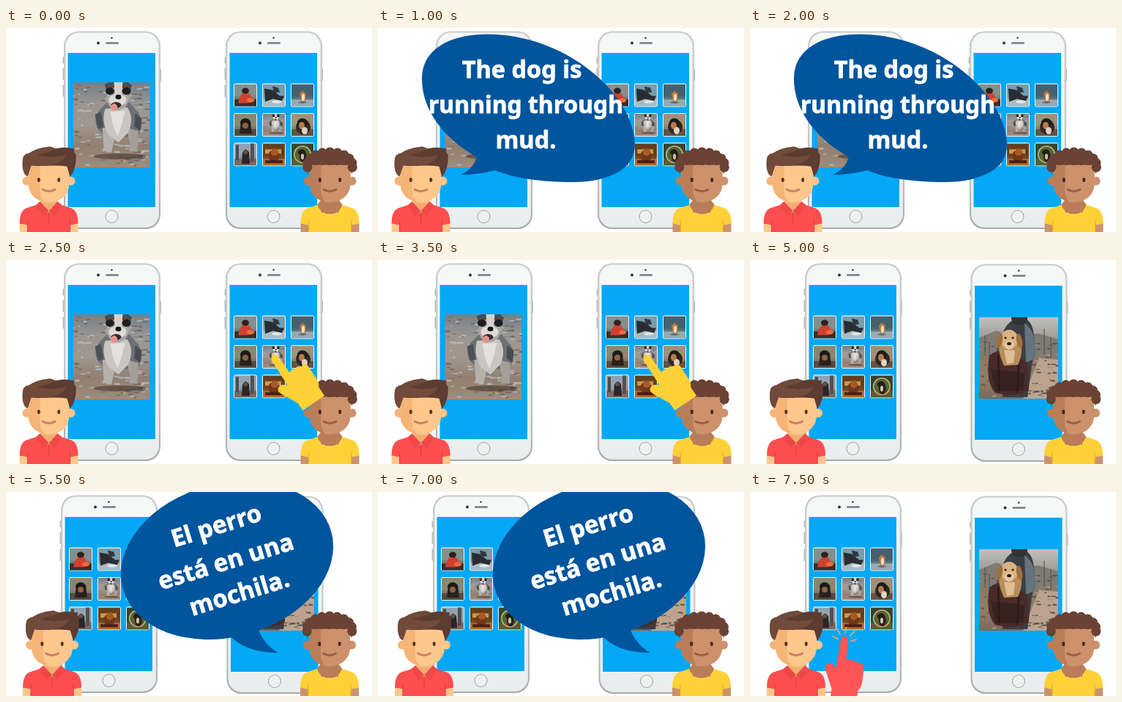
Recreate the animation shown at these times as an HTML page with a canvas. Size 500 by 278 pixels, loop 8 s.

```html
<!DOCTYPE html>
<html lang="en">
<head>
<meta charset="utf-8">
<title>Two learners and a dog</title>
<style>
html, body { margin: 0; width: 100%; height: 100%; overflow: hidden; background: #fff; }
canvas { display: block; width: 500px; height: 278px; }
</style>
</head>
<body>
<canvas id="stage"></canvas>
<script>
const canvas = document.getElementById('stage');
const c = canvas.getContext('2d');
const dpr = window.devicePixelRatio || 1;
canvas.width = 500 * dpr;
canvas.height = 278 * dpr;

const LOOP = 8000;
const BLUE = '#05a8f5', NAVY = '#00559d', RED = '#fc4d4f', YELLOW = '#fed136';

// ---- helpers ----
function at(x, y, draw, angle = 0) {
  c.save();
  c.translate(x, y);
  c.rotate(angle * Math.PI / 180);
  draw();
  c.restore();
}
function rect(x, y, w, h, fill) { c.fillStyle = fill; c.fillRect(x, y, w, h); }
function round(x, y, w, h, r, fill) {
  c.beginPath();
  c.roundRect(x, y, w, h, r);
  c.fillStyle = fill;
  c.fill();
}
function oval(x, y, rx, ry, fill, angle = 0) {
  c.beginPath();
  c.ellipse(x, y, rx, ry, angle, 0, 7);
  c.fillStyle = fill;
  c.fill();
}
function disc(x, y, r, fill) { oval(x, y, r, r, fill); }
function shape(d, fill) { c.fillStyle = fill; c.fill(new Path2D(d)); }
function line(d, color, width) {
  c.strokeStyle = color;
  c.lineWidth = width;
  c.lineCap = c.lineJoin = 'round';
  c.stroke(new Path2D(d));
}
function shade(h, ...stops) {
  const g = c.createLinearGradient(0, 0, 0, h);
  stops.forEach((s, i) => g.addColorStop(i / (stops.length - 1), s));
  return g;
}
function clip(w, h, draw) {
  c.save();
  c.beginPath();
  c.rect(0, 0, w, h);
  c.clip();
  draw();
  c.restore();
}
function flecks(n, x, y, w, h, colors, size) {
  let seed = 7;
  const rnd = () => (seed = seed * 16807 % 2147483647) / 2147483647;
  for (let i = 0; i < n; i++) {
    oval(x + rnd() * w, y + rnd() * h, size * (1 + rnd() * 2), size * (.4 + rnd() * .5),
      colors[i % colors.length]);
  }
}

// ---- phones ----
function phone(x, y) {
  at(x, y, () => {
    rect(-1.5, 35, 2, 9, '#b9bcbc');
    rect(-1.5, 50, 2, 16, '#b9bcbc');
    rect(-1.5, 73, 2, 16, '#b9bcbc');
    rect(131, 51, 2, 17, '#b9bcbc');
    round(0, 0, 132, 269.5, 20, shade(269, '#c6c9c9', '#c3c6c6', '#a9acac'));
    round(1.8, 1.5, 128.4, 266, 18.5, '#e2e5e5');
    round(3, 2.5, 126, 264, 17.5, shade(269, '#f6f8f8', '#f3f5f5', '#eaeded'));
    rect(5.5, 29.5, 119.5, 210, BLUE);
    disc(47, 16, 2, '#30343a');
    disc(65.5, 9, 1.3, '#3d4248');
    round(57, 14.8, 18, 2.4, 1.2, '#777c80');
    disc(65.5, 252.5, 9, '#9da1a1');
    disc(65.5, 252.5, 8, '#eff1f1');
  });
}

// ---- pictures ----
function mudDog() {
  clip(105, 116, () => {
    rect(0, 0, 105, 116, shade(116, '#71818b', '#9a9490', '#a1978f', '#927f70', '#a38b76'));
    flecks(150, 0, 4, 105, 112, ['#6d6a68', '#b9b3ad', '#7d6a5c', '#a8b3ba'], 1.6);
    oval(64, 101, 36, 4, 'rgba(60,48,42,.55)');
    shape('M36 38Q27 50 34 64L48 76 86 74Q98 62 91 44L78 28 46 28Z', '#6d7076');
    shape('M40 60L42 88 40 94 53 94 58 70Z', '#b5b0aa');
    shape('M73 62L78 84 76 94 88 95 89 66Z', '#a39f9b');
    shape('M44 36Q38 54 49 72L62 82 76 68Q84 48 74 34Z', '#c9c6c1');
    shape('M51 40L55 60 61 74 67 56 71 39Z', '#e4e1dc');
    shape('M30 44L38 40 42 62 34 63Z', '#4d5157');
    shape('M85 42L94 50 92 66 84 60Z', '#484b50');
    shape('M43 3L52-2 73-2 81 5 76 15 48 15Z', '#4b4d52');
    oval(61, 22, 15, 16, '#a9a8a6');
    shape('M56 0L68 0 66 20 58 20Z', '#d5d2cd');
    oval(50.5, 12, 6, 5, '#1e1f23');
    oval(73, 12, 6, 5, '#1e1f23');
    oval(61, 24, 12, 8, '#dedbd6');
    oval(62, 20, 4, 3.2, '#17181b');
    oval(59, 31, 7, 4, '#3b2528');
    oval(56, 34, 4.5, 5, '#e2918a', .4);
  });
}
function packDog() {
  clip(108, 111, () => {
    rect(0, 0, 108, 111, shade(111, '#bfc1bf', '#a09d96', '#8c7867', '#917d6b', '#7c6858'));
    shape('M0 28L24 18 48 30 80 22 108 30V54H0Z', '#7e7b74');
    shape('M60 111L82 56 108 58V111Z', '#bba38f');
    flecks(90, 0, 34, 108, 76, ['#66584c', '#a9978a', '#5c554e'], 1.5);
    line('M8 52V25M14 58V34M89 50V16M98 55V28', '#59544d', 1.2);
    // walker seen from behind
    shape('M30 38Q30 14 46 4L64 2Q77 10 76 44L72 66 66 109H32Z', '#3a3f45');
    oval(55, 1, 11, 10, '#30343a');
    shape('M62 8Q80 20 77 56L64 62Z', '#66727e');
    shape('M24 42L36 20 42 28 36 60 24 64Z', '#535a61');
    shape('M14 52Q24 44 38 46L66 62 68 98Q54 111 22 103Q8 88 14 52Z', '#492b28');
    shape('M15 70L62 76 61 100 23 101Z', '#372220');
    line('M26 52L28 100M54 64L52 102', '#241a1a', 2);
    shape('M28 28Q24 46 34 66L53 65Q62 46 55 26Q42 12 28 28Z', '#b98d5b');
    oval(41, 30, 12, 13, '#d9b384');
    oval(28, 32, 4, 10, '#a06f3f', .2);
    oval(55, 32, 4, 10, '#a06f3f', -.2);
    oval(41, 38, 6, 6, '#e6caa3');
    oval(41, 36, 3, 2.3, '#2e211b');
    disc(36, 28, 1.6, '#2e211b');
    disc(46, 28, 1.6, '#2e211b');
    shape('M34 45L49 45 47 62 38 64Z', '#dfbd94');
  });
}

const scenes = [
  ['#83918d', '#372f29', () => { shape('M7 18L13 9 20 13 27 23 18 26 5 26Z', '#d1402f');
    oval(15, 9, 5, 4, '#2b2321'); oval(22, 22, 5, 3, '#f06a3f'); }],
  ['#779dac', '#a9bbc1', () => { shape('M2 6L13 8 23 16 29 16 26 23 14 20 3 24Z', '#292d33');
    shape('M13 3L21 5 23 11 15 12Z', '#34383e'); oval(19, 24, 7, 2, '#e3e7e7'); }],
  ['#46616d', '#99a9ae', () => { shape('M11 13L15 9 20 13 19 23 16 25 13 22Z', '#b87a43');
    oval(16, 18, 2, 5, '#eee0cc'); oval(15, 25, 6, 1.2, '#59656a'); }],
  ['#8a8872', '#574b3f', () => { shape('M7 27L9 11 15 6 22 10 24 27Z', '#28211e');
    oval(15, 12, 7, 6, '#1e1a19'); oval(15, 16, 4, 4, '#8c6348'); }],
  null,
  ['#a0907b', '#655343', () => { oval(16, 18, 10, 10, '#302721'); oval(15, 12, 7, 6, '#201b18');
    oval(14, 16, 4, 5, '#b57a4d'); oval(18, 23, 4, 5, '#dfd1bf'); }],
  ['#91a3b2', '#776d65', () => { rect(2, 2, 4, 21, '#494b4b'); rect(22, 0, 5, 25, '#53514d');
    shape('M10 28L11 12 16 8 20 12 21 28Z', '#272628'); oval(15, 12, 3, 3, '#684d3e'); }],
  ['#64401f', '#b16a30', () => { rect(3, 8, 22, 6, '#d19546'); oval(15, 17, 8, 8, '#723819');
    oval(16, 12, 5, 5, '#a65a27'); rect(3, 23, 24, 4, '#43230f'); }],
  ['#3b4327', '#57602e', () => { disc(15, 15, 12, '#b6b38f'); disc(15, 15, 10.5, '#56652e');
    oval(16, 18, 5, 8, '#29251f'); oval(14, 12, 5, 4, '#211c18'); oval(15, 18, 2, 4, '#d3c4aa'); }]
];
function tile(i) {
  round(-1, -1, 32, 32, 2.5, '#eef6fa');
  clip(30, 30, () => {
    if (!scenes[i]) {
      c.scale(30 / 105, 30 / 116);
      mudDog();
      return;
    }
    const [sky, ground, draw] = scenes[i];
    rect(0, 0, 31, 31, shade(31, sky, sky, ground));
    rect(0, 21, 31, 10, ground);
    draw();
  });
}
function grid(x) {
  for (let i = 0; i < 9; i++) {
    at(x + i % 3 * 39, 76.5 + Math.floor(i / 3) * 40.4, () => tile(i));
  }
}

// ---- people ----
function face(skin, dark, eye, mouth) {
  disc(-30, 47, 6, dark);
  disc(30, 47, 6, skin);
  shape('M-12 66H12V90H-12Z', dark);
  shape('M-28 20H28V52Q26 70 8 75Q0 77-8 75Q-26 70-28 52Z', skin);
  shape('M-28 20H-12V60Q-12 71-4 76Q-26 72-28 52Z', dark);
  oval(-13.7, 45.5, 2, 2.9, eye);
  oval(13.7, 45.5, 2, 2.9, eye);
  line('M-8.5 58.5Q0 63.5 8.5 58.5', mouth, 3);
}
function torso(shirt, skin, fold) {
  shape('M-40 117V103H-29V117ZM40 117V103H29V117Z', skin);
  shape('M-40 105Q-40 88-31 84L-12 78H12L31 84Q40 88 40 105L29 107V117H-29V107Z', shirt);
  line('M-29 101V116M29 101V116', fold, 1.2);
}
function redBoy(x) {
  at(x, 161.5, () => {
    torso(RED, '#fdc68a', '#dc4043');
    face('#fec78c', '#f6b477', '#5a3424', '#c58360');
    shape('M-12 76Q0 82 12 76L11 81 0 89-11 81Z', '#f0ab6e');
    shape('M-12 75L0 88-8 95-18 80ZM12 75L0 88 8 95 18 80Z', '#f0474a');
    line('M0 90V104', '#dc4043', 1.2);
    shape('M-29 41Q-37 37-36 20Q-36 10-27 9Q-18 2 2 0Q8 2 10 3Q20 0 35 3Q33 7 37 11Q38 30 29 41L25 27Q12 25 2 26Q-10 27-24 26Z', '#704a3b');
    shape('M10 3Q20 0 35 3Q33 7 37 11Q38 30 29 41L25 27Q13 25 1 26Q21 21 23 12Q1 17-16 11Q-2 9 10 3Z', '#5d3c31');
  });
}
function yellowBoy(x) {
  const skin = '#cd926c', dark = '#b97e59', brown = '#6b4235';
  at(x, 161.5, () => {
    torso(YELLOW, skin, '#e6b525');
    face(skin, dark, '#4a2a20', '#995f46');
    shape('M-17 79L-12 73Q0 80 12 73L17 79Q13 92 0 92Q-13 92-17 79Z', dark);
    shape('M-28 20H28V52Q26 70 8 75Q0 77-8 75L-12 60V20Z', skin);
    oval(-13.7, 45.5, 2, 2.9, '#4a2a20');
    oval(13.7, 45.5, 2, 2.9, '#4a2a20');
    line('M-8.5 58.5Q0 63.5 8.5 58.5', '#995f46', 3);
    shape('M-30 38Q-35 14-20 9Q0 1 20 9Q35 14 30 38L26 25H-26Z', brown);
    for (let i = 0; i < 11; i++) {
      const a = Math.PI * (1.04 - i * .108);
      disc(Math.cos(a) * 31, 26 - Math.sin(a) * 18.5, 6.6, brown);
    }
    for (let i = -2; i < 3; i++) disc(i * 10, 19, 6.5, brown);
  });
}

// ---- hand, bubbles, ticks ----
function hand(x, y, angle, fill) {
  at(x, y, () => shape(
    'M-5 5Q-4-1 0-1Q5-1 5.5 5L6 31Q10 28 15 31Q20 29 24 33Q32 32 32 40V57Q32 65 28 70V84H-8V72L-18 52Q-24 42-17 39Q-12 37-6 44Z',
    fill), angle);
}
function taps(x, y, angle) {
  at(x, y, () => line('M0-6V-14M-7-3L-12-10M7-3L12-10M-9 4L-16 1M9 4L16 1', '#f5a862', 1.5), angle);
}
function words(text, x, y, size) {
  c.font = `700 ${size}px "Noto Sans", "Open Sans", sans-serif`;
  c.textAlign = 'center';
  c.textBaseline = 'alphabetic';
  c.fillStyle = c.strokeStyle = '#fff';
  c.lineWidth = .8;
  c.lineJoin = 'round';
  c.fillText(text, x, y);
  c.strokeText(text, x, y);
}
function englishBubble() {
  shape('M60 69C60 30 96 8.5 150 8.5C257 8.5 351 91 351 160C351 192 315 210 266 210C225 210 186 205 160 194Q136 200 113 200Q130 192 135 176C86 148 60 109 60 69Z', NAVY);
  words('The dog is', 196.5, 68, 32.5);
  words('running through', 202, 116, 31.8);
  words('mud.', 202, 164, 32.5);
}
function spanishBubble() {
  oval(302, 93, 147.6, 104.5, NAVY, -.265);
  shape('M306 196L342 180Q351 208 372 219C344 219 321 212 306 196Z', NAVY);
  [['El perro', 287, 45.5], ['está en una', 300, 94], ['mochila.', 318.5, 137]].forEach(
    ([text, x, y]) => at(x, y, () => words(text, 0, 12, 33), -17));
}
function tick(x, y) {
  at(x, y, () => {
    rect(-47, -47, 101, 93.5, '#67cc74');
    disc(0, 0, 43.5, '#85d9a5');
    disc(0, 0, 40, '#c3ecd3');
    disc(0, 0, 37.5, '#fff');
    disc(0, 0, 31, '#57b160');
    line('M-13.5 1.5L-4.5 10.5 15-10.5', '#fff', 4.6);
  });
}

// ---- scenes ----
function english(t) {
  phone(79, 4.5);
  phone(300, 4.5);
  at(91.5, 74, mudDog);
  grid(312);
  redBoy(58.5);
  yellowBoy(442.5);
  if (t >= 500 && t < 2500) englishBubble();
  if (t >= 2500) hand(365, 131, -34, YELLOW);
}
function correct() {
  phone(79, 4.5);
  phone(311.5, 4.5);
  tick(140.5, 139.5);
  tick(374, 140);
  redBoy(58.5);
  yellowBoy(439);
}
function spanish(t) {
  phone(75, 4.5);
  phone(301.5, 5.5);
  grid(87);
  at(313, 78, packDog);
  redBoy(63);
  yellowBoy(442);
  if (t >= 5500 && t < 7500) spanishBubble();
  if (t >= 7500) {
    taps(129.5, 198, 8);
    hand(129.5, 197.5, 8, '#ff5557');
  }
}

function frame(now) {
  const t = now % LOOP;
  c.setTransform(dpr, 0, 0, dpr, 0, 0);
  rect(0, 0, 500, 278, '#fff');
  if (t < 4000) english(t);
  else if (t < 5000) correct();
  else spanish(t);
  requestAnimationFrame(frame);
}
frame(0);
</script>
</body>
</html>
```
